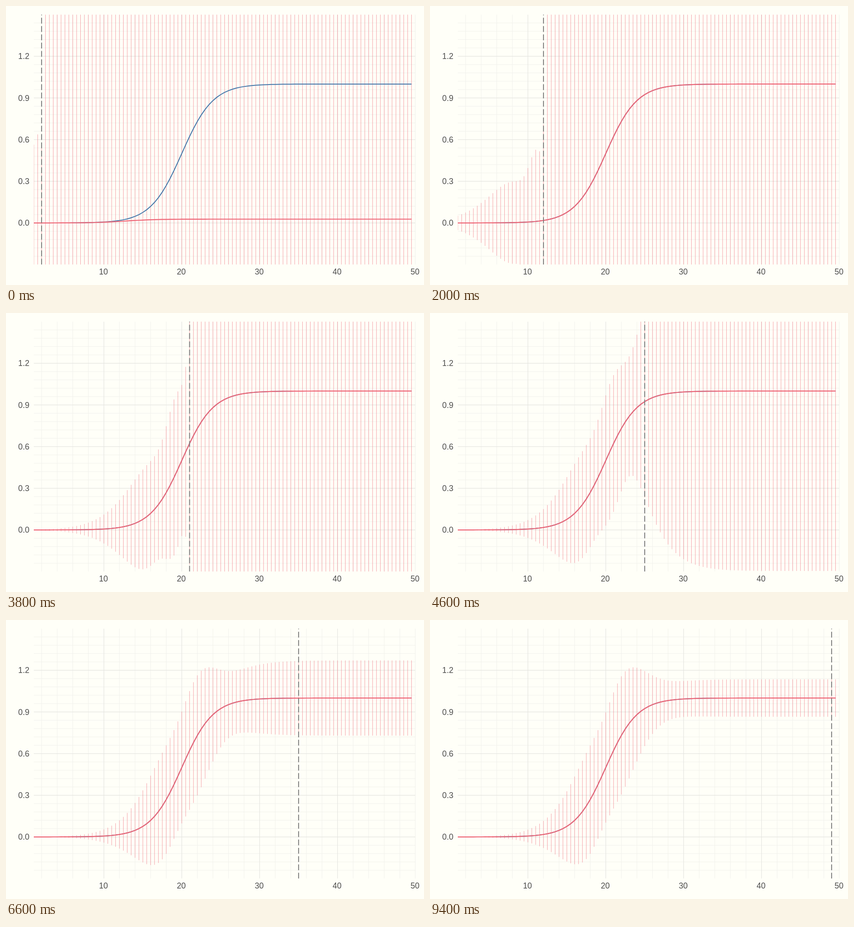
An HTML page with a canvas that plays this animation: 917 px wide and 611 px high, repeating every 9600 ms.

```html
<!DOCTYPE html>
<html lang="en">
<head>
<meta charset="utf-8">
<title>Logistic fit with interval</title>
<style>
  html, body { margin: 0; width: 100%; height: 100%; overflow: hidden; background: #fffff8; }
  canvas { display: block; }
</style>
</head>
<body>
<canvas id="stage" width="917" height="611"></canvas>
<script>
const ctx = document.getElementById('stage').getContext('2d');
const STEP = 200, FIRST = 2, COUNT = 48;
const TOP = 18.7, BOTTOM = 566.3, LEFT = 61, RIGHT = 898.2;
const BLUE = '#4477aa', RED = '#ee6677';

const px = x => LEFT + 17.085 * (x - 1);
const py = y => 475.1 - 304.2 * y;

// The early growth is known at once; only the ceiling is learned over time.
const logistic = (x, cap = 1) => cap / (1 + cap * Math.exp(-.5 * (x - 20)));
const ceiling = t => Math.pow(.0275, Math.max(0, 11 - t) / 9);

// Observations say least around the steep part of the curve.
const weight = x => 3.2 / (1 + 1.9 * Math.exp(-(((x - 23) / 10) ** 2)));

// Directions in which the three parameters move the curve, scaled to the value at t.
function gradient(x, t) {
  const y = logistic(x), s = y / logistic(t);
  return [s, s * (1 - y) * (x - t), s * s];
}

const dot = (a, b, n) => {
  let sum = 0;
  for (let i = 0; i < n; i++) sum += a[i] * b[i];
  return sum;
};

function cholesky(m) {
  const l = m.map(row => row.map(() => 0));
  for (let i = 0; i < m.length; i++) {
    for (let j = 0; j <= i; j++) {
      const rest = m[i][j] - dot(l[i], l[j], j);
      l[i][j] = i === j ? Math.sqrt(Math.max(rest, 1e-12)) : rest / l[j][j];
    }
  }
  return l;
}

// Standard error of the fitted curve, given one observation per unit up to t.
function errorOfFit(t) {
  const info = [[0, 0, 0], [0, 0, 0], [0, 0, 0]];
  for (let x = 0; x <= t; x++) {
    const g = gradient(x, t), w = weight(x);
    info.forEach((row, i) => row.forEach((_, j) => { row[j] += w * g[i] * g[j]; }));
  }
  const l = cholesky(info);
  return x => {
    const g = gradient(x, t), z = [];
    for (let i = 0; i < 3; i++) z[i] = (g[i] - dot(l[i], z, i)) / l[i][i];
    return Math.hypot(...z);
  };
}

function line(x0, y0, x1, y1) {
  ctx.beginPath();
  ctx.moveTo(x0, y0);
  ctx.lineTo(x1, y1);
  ctx.stroke();
}

function pen(color, width, alpha = 1) {
  ctx.strokeStyle = color;
  ctx.lineWidth = width;
  ctx.globalAlpha = alpha;
}

function drawGrid() {
  for (const major of [false, true]) {
    pen(major ? '#e5e5e1' : '#f1f1ec', major ? 1.2 : 1);
    for (let i = -4; i < 25; i++) {
      if ((i % 5 === 0) === major) line(LEFT, py(i * .06), RIGHT, py(i * .06));
    }
    for (let x = 2; x <= 50; x += 2) {
      if ((x % 10 === 0) === major) line(px(x), TOP, px(x), BOTTOM);
    }
  }
}

function drawLabels() {
  ctx.fillStyle = '#4d4d4d';
  ctx.font = '17.6px "Liberation Sans", Arial, sans-serif';
  ctx.textAlign = 'right';
  for (let i = 0; i < 5; i++) ctx.fillText((i * .3).toFixed(1), 51.3, py(i * .3) + 6.3);
  ctx.textAlign = 'center';
  for (let x = 10; x <= 50; x += 10) ctx.fillText(x, px(x) - 1, 587.5);
}

function drawBars(t, cap) {
  const error = errorOfFit(t);
  pen(RED, .95, .64);
  for (let x = 1; x < 50; x += .5) {
    const y = logistic(x, cap), h = error(x);
    line(px(x), Math.max(TOP, py(y + h)), px(x), Math.min(BOTTOM, py(y - h)));
  }
}

function drawCurve(cap) {
  ctx.beginPath();
  for (let x = 1; x < 50; x += .5) ctx.lineTo(px(x), py(logistic(x, cap)));
  ctx.stroke();
}

function draw(t) {
  const cap = ceiling(t);
  ctx.globalAlpha = 1;
  ctx.fillStyle = '#fffff8';
  ctx.fillRect(0, 0, 917, 611);
  drawLabels();
  ctx.save();
  ctx.beginPath();
  ctx.rect(LEFT, TOP, RIGHT - LEFT, BOTTOM - TOP);
  ctx.clip();
  drawGrid();
  drawBars(t, cap);
  pen(BLUE, 2);
  drawCurve(1);
  pen(RED, 2.2);
  drawCurve(cap);
  pen('#7f7f7f', 2);
  ctx.setLineDash([12.74, 5.46]);
  line(px(t), BOTTOM, px(t), TOP);
  ctx.restore();
}

let shown = -1;
const start = performance.now();
function tick() {
  const step = Math.floor((performance.now() - start) / STEP) % COUNT;
  if (step !== shown) draw(FIRST + (shown = step));
  requestAnimationFrame(tick);
}
tick();
</script>
</body>
</html>
```
